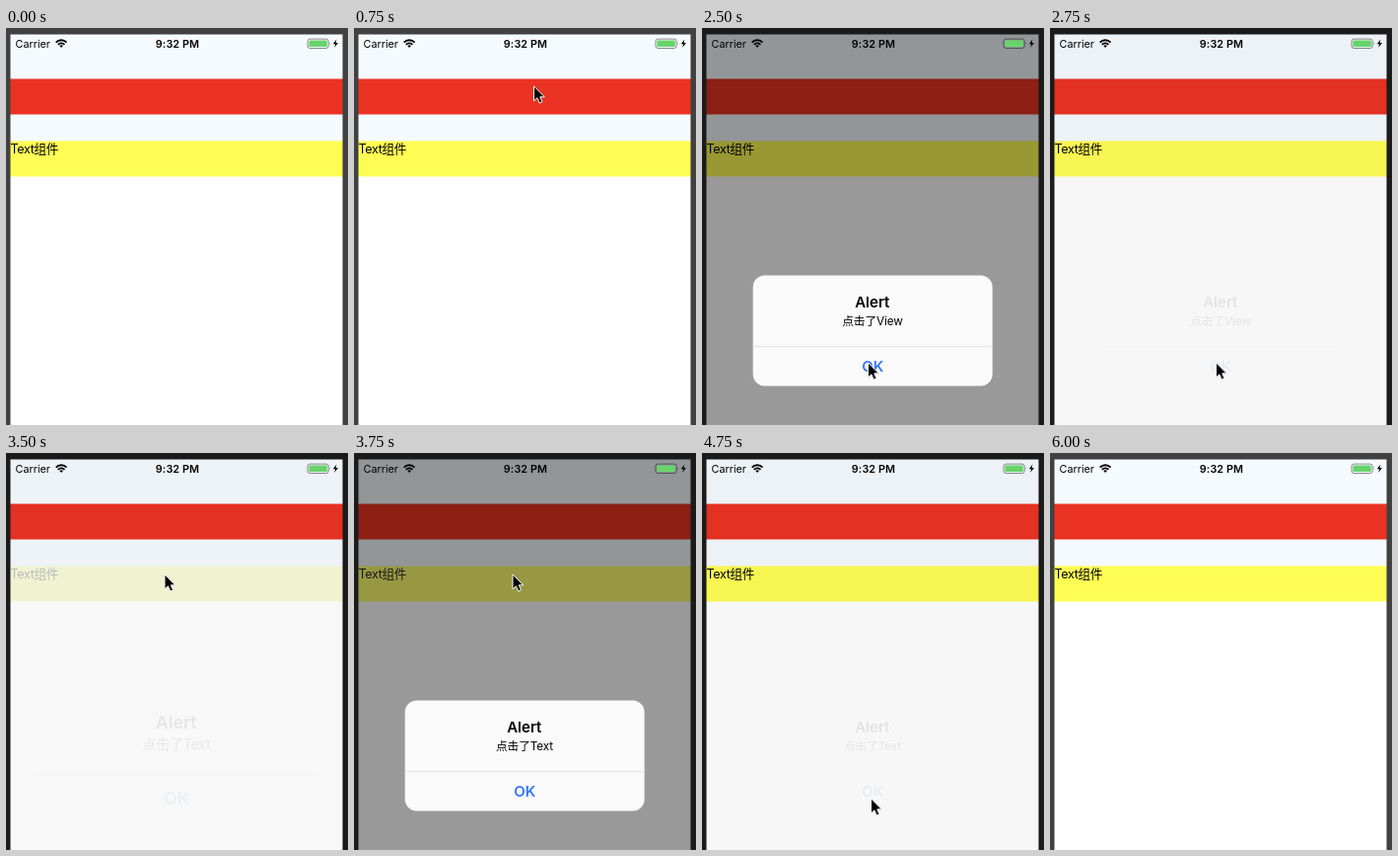
These frames come from a looping animation (347x402 px, 6.25 s). An HTML page:

```html
<!DOCTYPE html>
<html lang="zh">
<head>
<meta charset="utf-8">
<style>
html, body { margin: 0; width: 100%; height: 100%; overflow: hidden; }
svg { display: block; width: 347px; height: 402px; }
text { font-family: Inter, "Noto Sans CJK SC", "Noto Sans CJK", sans-serif; }
.bold { font-weight: 600; }
.mid { text-anchor: middle; }
</style>
</head>
<body>
<svg viewBox="0 0 347 402">
  <rect width="347" height="402" fill="#fff"/>
  <rect width="347" height="150" fill="#f5fafe"/>
  <rect id="view" y="51.5" width="347" height="36" fill="#ea3323"/>
  <g id="label">
    <rect y="114.4" width="347" height="36" fill="#fffd54"/>
    <text x="4.6" y="126.5" font-size="12.6" letter-spacing="-.4">Text组件</text>
  </g>
  <rect id="dim" width="347" height="402"/>
  <path id="bezel" d="M0 0H347V402H341.5V6.5H4.5V402H0Z"/>

  <g id="status">
    <text x="9.6" y="19.7" font-size="10.8">Carrier</text>
    <text class="bold mid" x="174" y="19.7" font-size="10.8" letter-spacing=".1">9:32 PM</text>
    <g fill="none" stroke="#000">
      <path d="M50.7 14.6a7.5 7.5 0 0 1 10.8 0" stroke-width="1.9"/>
      <path d="M52.8 16.8a4.6 4.6 0 0 1 6.6 0" stroke-width="1.7"/>
      <rect x="306" y="11.1" width="21.2" height="9.4" rx="2.4" stroke-width=".9" opacity=".5"/>
    </g>
    <path d="M54.3 18.1a2.6 2.6 0 0 1 3.6 0l-1.8 2z"/>
    <rect x="307.4" y="12.5" width="18.4" height="6.6" rx="1.2" fill="#67d46a"/>
    <path d="M328.3 14.3q1.3 1.5 0 3z" opacity=".5"/>
    <path d="M335.4 11.4l-3.6 4.8h2.3l-.9 3.6 3.8-4.9h-2.4z"/>
  </g>

  <g id="alert">
    <g id="box">
      <rect x="51.7" y="250.5" width="243" height="112" rx="12" fill="#fafafa"/>
      <path d="M51.7 322.5h243" stroke="#dedede" stroke-width=".8"/>
    </g>
    <g id="words">
      <text class="bold mid" x="172.8" y="283" font-size="15">Alert</text>
      <text id="message" class="mid" x="173" y="301" font-size="11.7" letter-spacing="-.1"></text>
      <text class="bold mid" x="173.2" y="348.2" font-size="15" fill="#3478f6">OK</text>
    </g>
  </g>

  <path id="cursor" d="M0 .9V15.8L3.4 12.8 5.7 18 8.5 16.8 6.3 11.8H10.8Z" stroke="#fff" stroke-width="1"
    style="filter:drop-shadow(0 .6px .6px #0004)"/>
</svg>
<script>
const LOOP = 6250, STEP = 250;
const $ = id => document.getElementById(id);
const set = (id, name, value) => $(id).setAttribute(name, value);

// Pointer legs: each glides to (x, y) between start and end.
const origin = { x: 245, y: 6 };
const legs = [
  { start: 250, end: 750, x: 182.5, y: 58 },
  { start: 1975, end: 2400, x: 168.5, y: 338 },
  { start: 2750, end: 3050, x: 161, y: 122 },
  { start: 3750, end: 4500, x: 171.5, y: 349 }
];
const taps = [
  { target: "view", name: "View", open: 1278, close: 2500 },
  { target: "label", name: "Text", open: 3452, close: 4500 }
];
const ALERT_TIME = 300, TOUCH_TIME = 420;

const ramp = (t, start, end) => Math.min(1, Math.max(0, (t - start) / (end - start)));
const smooth = u => u * u * (3 - 2 * u);
const easeOut = u => 1 - (1 - u) ** 3;

function pointerAt(t) {
  return legs.reduce((p, { start, end, x, y }) => {
    const k = easeOut(ramp(t, start, end));
    return { x: p.x + (x - p.x) * k, y: p.y + (y - p.y) * k };
  }, origin);
}

function drawAlert(t) {
  const tap = taps.findLast(tap => t >= tap.open) || taps[0];
  const { open, close } = tap;
  const shown = smooth(ramp(t, open, open + ALERT_TIME)) - smooth(ramp(t, close, close + ALERT_TIME));
  const scale = t < close ? 1.2 - 0.2 * shown : 1;

  set("dim", "opacity", 0.4 * shown);
  set("box", "opacity", shown * (2 - shown));
  set("words", "opacity", shown);
  set("alert", "transform", `translate(173.2 306.5) scale(${scale}) translate(-173.2 -306.5)`);
  $("message").textContent = "点击了" + tap.name;
}

function draw() {
  const t = Math.floor(performance.now() % LOOP / STEP) * STEP;

  // A tapped element drops to 20% opacity and fades back.
  for (const { target, open } of taps)
    set(target, "opacity", t < open ? 1 : 0.2 + 0.8 * smooth(ramp(t, open, open + TOUCH_TIME)));
  drawAlert(t);

  const { x, y } = pointerAt(t);
  set("cursor", "transform", `translate(${x} ${y})`);
  set("cursor", "visibility", t >= 250 && t < 5250 ? "visible" : "hidden");
  set("bezel", "fill", t >= 1500 && t < 6000 ? "#1c1b1b" : "#424141");
  requestAnimationFrame(draw);
}
draw();
</script>
</body>
</html>
```
